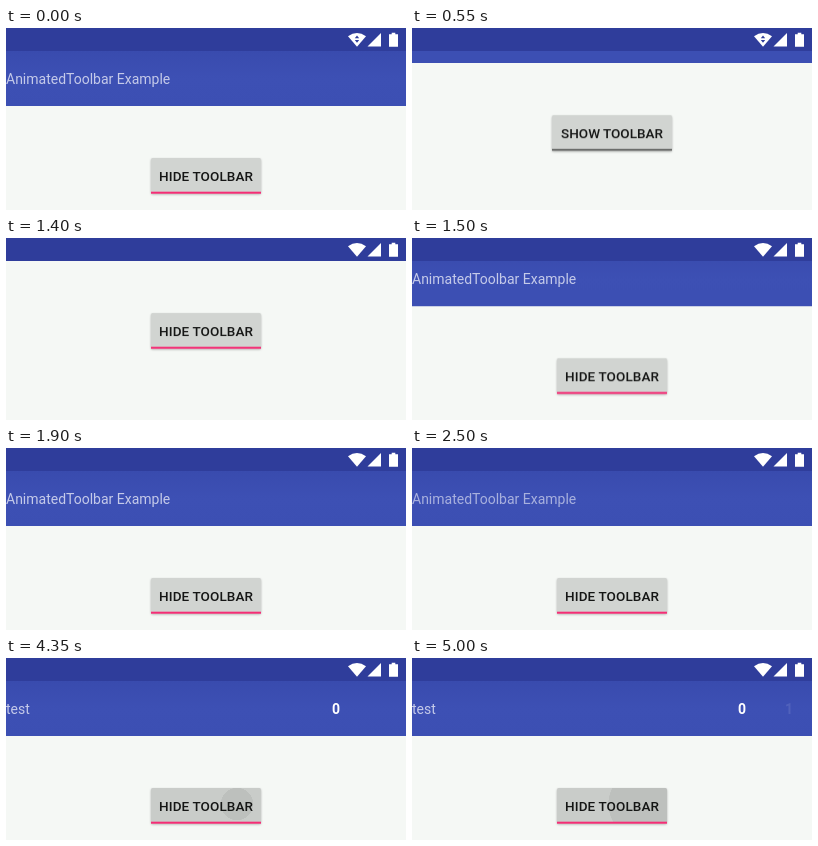
An HTML page for the animation above (5050 ms loop, 400 by 182 pixels).

```html
<!DOCTYPE html>
<html lang="en">
<head>
<meta charset="utf-8">
<title>Animated toolbar</title>
<style>
  html, body { margin: 0; width: 100%; height: 100%; overflow: hidden; background: #f5f8f5; }
  svg { display: block; width: 100vw; height: 100vh; font-family: Roboto, sans-serif; }

  .sheet, .hide, .show, .old, .new, .zero, .one, .arrows, .ripple, .press {
    animation: 5050ms linear infinite;
  }

  /* Toolbar and content travel together */
  .sheet { animation-name: slide; }
  @keyframes slide {
    0%, 8.911% { transform: translateY(0); animation-timing-function: cubic-bezier(.37, 0, .63, 1); }
    11.822% { transform: translateY(-55px); }
    27.723% { transform: translateY(-55px); animation-timing-function: cubic-bezier(.37, 0, .63, 1); }
    30.495%, 100% { transform: translateY(0); }
  }

  .hide { animation-name: hide; animation-timing-function: step-end; }
  .show { animation-name: show; animation-timing-function: step-end; }
  @keyframes hide { 0% { opacity: 1; } 8.9% { opacity: 0; } 27.71% { opacity: 1; } }
  @keyframes show { 0% { opacity: 0; } 8.9% { opacity: 1; } 27.71% { opacity: 0; } }

  .ripple { animation-name: ripple; transform-origin: 231px 146px; }
  .press { animation-name: press; }
  @keyframes ripple {
    0%, 8.9% { transform: scale(0); opacity: 0; }
    8.911% { transform: scale(.1); opacity: .065; }
    10.891% { transform: scale(.47); opacity: .065; }
    14% { transform: scale(1); opacity: .05; }
    17.8%, 27.723% { transform: scale(1); opacity: 0; }
    27.73% { transform: scale(.1); opacity: 0; }
    29.7% { transform: scale(.47); opacity: .05; }
    33% { transform: scale(1); opacity: .04; }
    36.6%, 100% { transform: scale(1); opacity: 0; }
  }
  @keyframes press {
    0%, 7.9% { opacity: 0; }
    8.911%, 12% { opacity: .035; }
    17.8%, 27.723% { opacity: 0; }
    29%, 32% { opacity: .03; }
    36.6%, 100% { opacity: 0; }
  }

  .old { animation-name: old; }
  .new { animation-name: new; }
  .zero { animation-name: zero; }
  .one { animation-name: one; }
  @keyframes old { 0%, 48.515% { opacity: 1; } 53.465%, 99.99% { opacity: 0; } 100% { opacity: 1; } }
  @keyframes new { 0%, 53.465% { opacity: 0; } 58.416%, 100% { opacity: 1; } }
  @keyframes zero { 0%, 74.257% { opacity: 0; } 79.208%, 100% { opacity: 1; } }
  @keyframes one { 0%, 98.02% { opacity: 0; } 99.01% { opacity: .1; } 100% { opacity: .25; } }

  .arrows { animation-name: arrows; animation-timing-function: step-end; }
  @keyframes arrows { 0% { opacity: 1; } 19.8% { opacity: 0; } }

  .title { font-size: 14px; fill: #c5cae9; }
  .item { font-size: 14px; font-weight: 700; fill: #fff; text-anchor: middle; }
  .label { font-size: 13.5px; font-weight: 500; fill: #151615; text-anchor: middle; }
  .face { fill: #d1d4d1; filter: drop-shadow(0 1px 1px rgba(0, 0, 0, .28)); }
</style>
</head>
<body>
<svg viewBox="0 0 400 182" preserveAspectRatio="none">
  <defs>
    <linearGradient id="bar" x2="0" y2="1">
      <stop offset="0" stop-color="#394bae"/>
      <stop offset=".5" stop-color="#3d50b4"/>
      <stop offset="1" stop-color="#3c4fb3"/>
    </linearGradient>
    <clipPath id="wide"><rect x="140" y="130" width="120" height="35" rx="1.5"/></clipPath>
    <clipPath id="narrow"><rect x="145" y="130" width="110" height="35" rx="1.5"/></clipPath>
    <g id="touch">
      <rect class="press" x="140" y="130" width="120" height="35"/>
      <circle class="ripple" cx="231" cy="146" r="100"/>
    </g>
  </defs>

  <rect width="400" height="182" fill="#f5f8f5"/>

  <g class="sheet">
    <rect y="23" width="400" height="55" fill="url(#bar)"/>
    <text class="title old" x="0" y="56">AnimatedToolbar Example</text>
    <text class="title new" x="0" y="56">test</text>
    <text class="item zero" x="330" y="56">0</text>
    <text class="item one" x="377" y="56">1</text>

    <g class="hide">
      <rect class="face" x="145" y="130" width="110" height="35.5" rx="1.5"/>
      <g clip-path="url(#narrow)"><use href="#touch"/></g>
      <rect x="145" y="163.7" width="110" height="2" fill="#f52d75"/>
      <text class="label" x="200" y="153" textLength="94">HIDE TOOLBAR</text>
    </g>
    <g class="show">
      <rect class="face" x="140" y="130" width="120" height="35.5" rx="1.5"/>
      <g clip-path="url(#wide)"><use href="#touch"/></g>
      <rect x="140" y="163.8" width="120" height="1.7" fill="#5b5d5b"/>
      <text class="label" x="200" y="153">SHOW TOOLBAR</text>
    </g>
  </g>

  <rect width="400" height="23" fill="#2f3d9b"/>
  <g fill="#fff">
    <path d="M342 8.3Q351 1.7 360 8.3L351 18.7Z"/>
    <path d="M375 5V18.5H361.5Z"/>
    <path d="M383 6.2H385.7V4.7H389.3V6.2H392V18.7H383Z"/>
  </g>
  <path class="arrows" d="M348.8 10.2L351 7.4L353.2 10.2ZM348.8 12L351 14.8L353.2 12Z" fill="#2f3d9b"/>
</svg>
</body>
</html>
```
